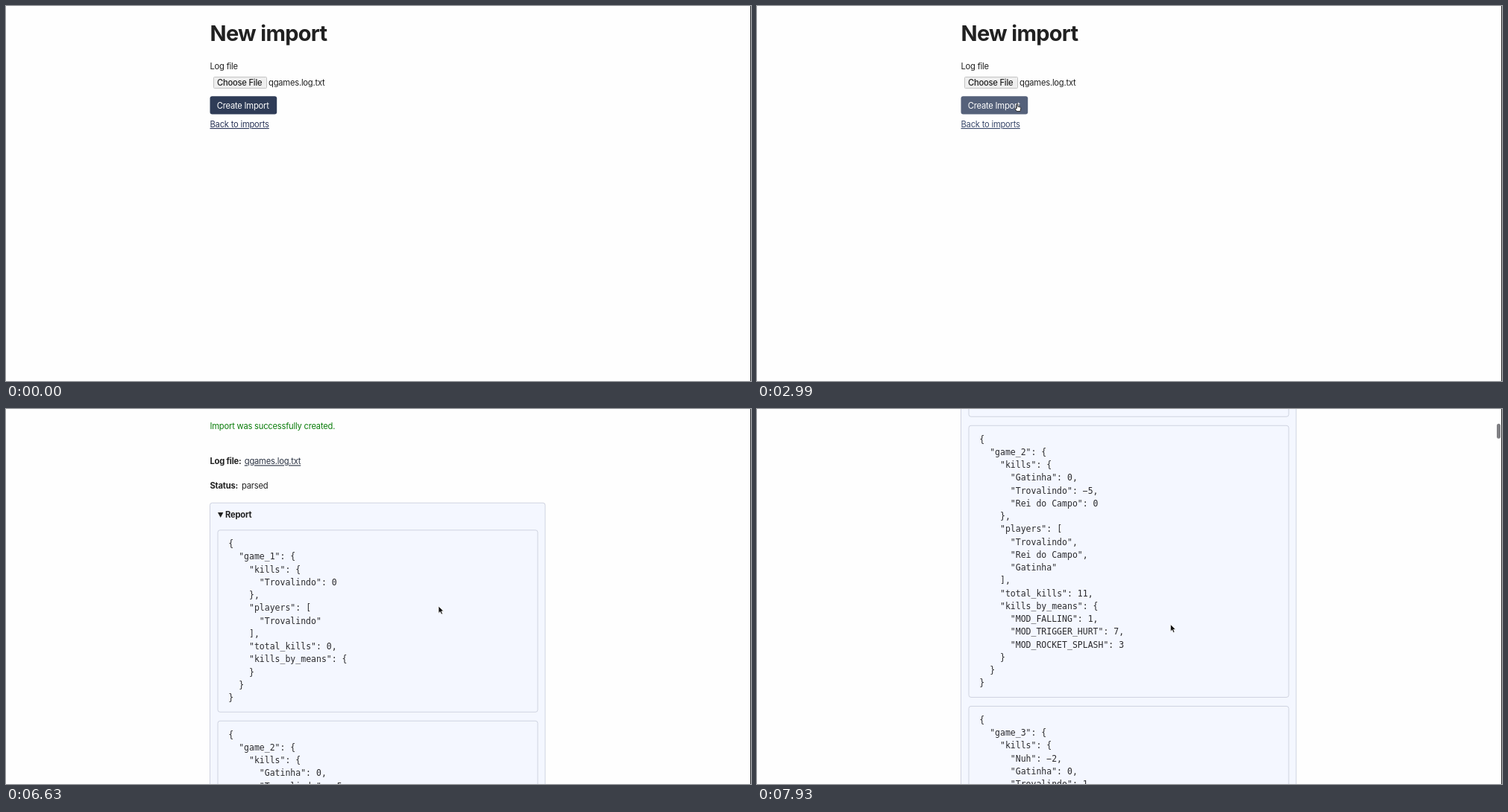
An HTML page for the animation above (8000 ms loop, 999 px wide and 504 px high).

```html
<!DOCTYPE html>
<html lang="en">
<head>
<meta charset="utf-8">
<title>Log import</title>
<style>
  html, body { margin: 0; width: 100%; height: 100%; overflow: hidden; background: #fefefe; }
  svg { display: block; width: 999px; height: 504px; }
  text { font: 11.2px Inter, sans-serif; letter-spacing: -0.02em; fill: #212121; white-space: pre; }
  .title { font-size: 29px; font-weight: 700; letter-spacing: -0.024em; }
  .bold { font-weight: 650; }
  .medium { font-weight: 500; }
  .light { fill: #fff; }
  .notice { fill: #0b7d0b; }
  .link { text-decoration: underline; }
  .code { font: 11.5px "DejaVu Sans Mono", monospace; letter-spacing: 0; fill: #2b2b2e; }
  .panel { fill: #f4f7ff; stroke: #cfd3e0; }
</style>
</head>
<body>
<svg id="stage" viewBox="0 0 999 504">
  <g id="form"></g>
  <g id="result"></g>
  <rect id="thumb" x="992" width="5" height="20" rx="2.5" fill="#808084"/>
  <path d="M998.5 0V504" stroke="#26282b"/>
  <g id="pointer">
    <path id="arrow" d="M0 0V9.4L2.2 7.4 3.8 11 5.5 10.2 4 6.8H6.9Z" fill="#111" stroke="#fff" stroke-width=".7"/>
    <path id="hand" d="M-.8 0Q0-1 .8 0V3.2L4 4Q5 4.3 4.8 5.6L4 9.5H-.9L-3 6Q-2.8 4.7-.8 6Z" fill="#fff" stroke="#222" stroke-width=".9"/>
  </g>
</svg>
<script>
const LOOP = 8000, STEP = 130, LINE = 17.25;
const byId = id => document.getElementById(id);

function add(parent, tag, attrs, content = '') {
  const node = document.createElementNS('http://www.w3.org/2000/svg', tag);
  for (const key in attrs) node.setAttribute(key, attrs[key]);
  node.textContent = content;
  return parent.appendChild(node);
}
const label = (parent, x, y, content, style = '') =>
  add(parent, 'text', { x, y, class: style }, content);
const box = (parent, x, y, width, height, attrs) =>
  add(parent, 'rect', { x, y, width, height, rx: 3, ...attrs });
const show = (node, visible) => { node.style.display = visible ? '' : 'none'; };

// Import form
const form = byId('form');
label(form, 273.5, 47, 'New import', 'title');
label(form, 273.5, 85.3, 'Log file');
box(form, 278.5, 95.5, 71, 15, { rx: 1, fill: '#efefef', stroke: '#c4c4c4' });
label(form, 283, 107, 'Choose File', 'medium');
label(form, 352, 107, 'qgames.log.txt');
const createButton = box(form, 273.5, 121.3, 89.7, 24.2);
label(form, 282.8, 138, 'Create Import', 'light');
const formLink = label(form, 273.5, 163, 'Back to imports', 'link');

// Import result
const result = byId('result');
label(result, 273.5, 27, 'Import was successfully created.', 'notice');
label(result, 273.5, 74.4, 'Log file:', 'bold');
const fileLink = label(result, 319.8, 74.4, 'qgames.log.txt', 'link');
label(result, 273.5, 106.5, 'Status:', 'bold');
const statusLabel = label(result, 316, 106.5, '');

const actions = add(result, 'g');
label(actions, 273.5, 138.8, 'Back to imports', 'link').style.fill = '#1d4a55';
box(actions, 273.5, 143.5, 108.5, 24, { fill: '#35413b' });
label(actions, 278.8, 159.8, 'Destroy this import', 'light');

const report = add(result, 'g');
box(report, 273.5, 126.2, 449.5, 1400, { class: 'panel' });
add(report, 'path', { d: 'M284 139H291.4L287.7 146Z', fill: '#212121' });
label(report, 294, 146.2, 'Report', 'bold');

const games = [
  { kills: { Trovalindo: 0 }, players: ['Trovalindo'], total_kills: 0, kills_by_means: {} },
  {
    kills: { Gatinha: 0, Trovalindo: -5, 'Rei do Campo': 0 },
    players: ['Trovalindo', 'Rei do Campo', 'Gatinha'],
    total_kills: 11,
    kills_by_means: { MOD_FALLING: 1, MOD_TRIGGER_HURT: 7, MOD_ROCKET_SPLASH: 3 }
  },
  {
    kills: { Nuh: -2, Gatinha: 0, Trovalindo: 1, 'Rei do Campo': -1 },
    players: ['Rei do Campo', 'Trovalindo', 'Nuh'],
    total_kills: 4,
    kills_by_means: { MOD_FALLING: 1 }
  }
];
let cardTop = 162.8;
games.forEach((game, i) => {
  const lines = JSON.stringify({ ['game_' + (i + 1)]: game }, null, 2)
    .replace('{}', '{\n    }').replace(/-/g, '\u2212').split('\n');
  const height = lines.length * LINE + 20.2;
  box(report, 284, cardTop, 429, height, { class: 'panel' });
  lines.forEach((line, n) => {
    const code = line.trimStart();
    const indent = (line.length - code.length) * 6.92;
    label(report, 298.3 + indent, cardTop + 22.3 + n * LINE, code, 'code');
  });
  cardTop += height + 12;
});

// Rows: time, then the values reached at that time
const pointerPath = [
  [520, 705, 151], [780, 610, 138], [1040, 480, 115], [1300, 410, 108], [1430, 401.5, 107.5],
  [1690, 385, 116], [2080, 355, 130], [2340, 349, 132], [3120, 349, 132],
  [3380, 560, 142], [3640, 711.5, 151.5], [5590, 711.5, 151.5], [5720, 687, 153.5],
  [6370, 687, 153.5], [6500, 645, 195], [6630, 580, 265], [6760, 554.5, 289.5]
];
const scrollPath = [
  [6890, 0], [7020, 95], [7150, 215], [7280, 292], [7410, 341],
  [7540, 370], [7670, 386], [7800, 394], [7930, 397]
];

function sample(rows, time) {
  const next = rows.findIndex(row => row[0] > time);
  if (next < 0) return rows.at(-1).slice(1);
  if (next === 0) return rows[0].slice(1);
  const from = rows[next - 1], to = rows[next];
  const part = (time - from[0]) / (to[0] - from[0]);
  return from.slice(1).map((value, i) => value + (to[i + 1] - value) * part);
}

function draw(now) {
  const time = Math.floor(now % LOOP / STEP) * STEP;
  const created = time >= 3250, parsed = time >= 5460;
  const hover = time >= 2080 && !created;
  const [x, y] = sample(pointerPath, time);
  const [scroll] = sample(scrollPath, time);

  show(form, !created);
  show(result, created);
  show(actions, !parsed);
  show(report, parsed);
  statusLabel.textContent = parsed ? 'parsed' : 'parsing';
  fileLink.style.fill = parsed ? '#2a3242' : '#1c3d58';
  createButton.style.fill = time < 520 ? '#2f3c57' : hover ? '#55617a' : '#0d47a1';
  formLink.style.fill = time < 520 ? '#2a3558' : hover ? '#39486b' : '#0d47a1';

  result.setAttribute('transform', `translate(0 ${-scroll})`);
  byId('thumb').setAttribute('y', 0.5 + scroll * 0.0485);
  show(byId('thumb'), time >= 7020);

  byId('pointer').setAttribute('transform', `translate(${x} ${y})`);
  show(byId('pointer'), time >= 520);
  show(byId('arrow'), !hover);
  show(byId('hand'), hover);
}

const start = performance.now();
(function tick() {
  draw(performance.now() - start);
  requestAnimationFrame(tick);
})();
</script>
</body>
</html>
```
